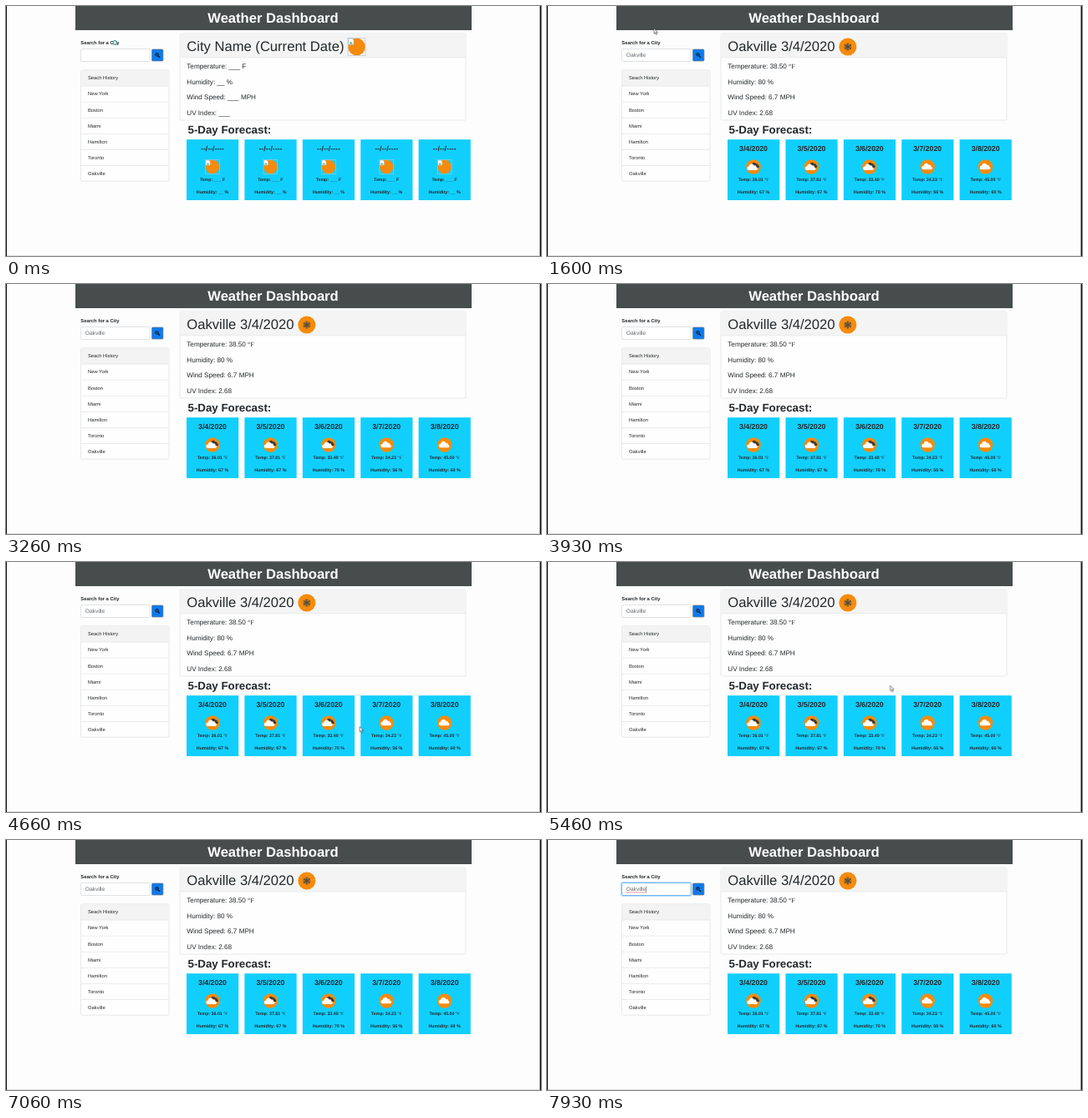
An HTML page that plays this animation: 640 by 300 pixels, repeating every 8000 ms.

```html
<!DOCTYPE html>
<html lang="en">
<head>
<meta charset="utf-8">
<title>Weather Dashboard</title>
<style>
html, body { margin: 0; width: 100%; height: 100%; overflow: hidden; background: #fdfdfd; }
svg { display: block; width: 640px; height: 300px; }
text { font-family: "Liberation Sans", Arial, sans-serif; fill: #24282b; text-rendering: geometricPrecision; white-space: pre; }
.b { font-weight: bold; }
.unit { font-family: "Liberation Serif", serif; font-weight: normal; }
</style>
</head>
<body>
<svg id="stage" viewBox="0 0 640 300" xmlns="http://www.w3.org/2000/svg">
  <defs>
    <g id="broken">
      <circle r="10.4" fill="#f68b0b"/>
      <rect x="-10.5" y="-10.5" width="21" height="21" fill="none" stroke="#c4c4c4" stroke-width=".7"/>
      <path d="M-10-10h4.5l2 2v5.5h-6.500z" fill="#fff" stroke="#9bb0c4" stroke-width=".7"/>
      <path d="M-9-3.500l2-2.500 2.500 2.500z" fill="#58a55c"/>
    </g>
    <g id="snow">
      <circle r="10.5" fill="#f68b0b"/>
      <g id="flake" fill="none" stroke="#4c4a46" stroke-width="1"></g>
    </g>
    <path id="puff" d="M-4.600 3.300a2.300 2.300 0 0 1 0-4.600a3.200 3.200 0 0 1 6.100-1a2.600 2.600 0 0 1 3 2.300a1.700 1.700 0 0 1 0 3.300z"/>
    <g id="cloud">
      <circle r="8.700" fill="#f68b0b"/>
      <use href="#puff" fill="#fff"/>
    </g>
    <g id="clouds">
      <circle r="8.700" fill="#f68b0b"/>
      <use href="#puff" fill="#3d3b39" transform="translate(2 -1.700) scale(.85)"/>
      <use href="#puff" fill="#fff" transform="translate(-.8 .7)"/>
    </g>
  </defs>
  <rect width="640" height="300" fill="#fdfdfd"/>
  <g id="base"></g>
  <g id="blank"></g>
  <g id="data" opacity="0"></g>
  <g id="focus" opacity="0">
    <rect x="88.600" y="50.900" width="84.200" height="16.200" rx="2" fill="none" stroke="#bfe0ff" stroke-width="1.600"/>
    <rect x="89.500" y="51.500" width="82.700" height="15" rx="1.300" fill="#fff" stroke="#62b0f5" stroke-width=".9"/>
  </g>
  <g id="typed" opacity="0"></g>
  <g id="spell" opacity="0">
    <path id="wave" fill="none" stroke="#e2504d" stroke-width=".7"/>
    <path d="M118.700 55.500v7" stroke="#444" stroke-width=".6"/>
  </g>
  <g id="busy">
    <circle cx="130.300" cy="44" r="2.300" fill="#fdfdfd" stroke="#4f9c9c" stroke-width="1.200"/>
  </g>
  <g id="pointer" opacity="0">
    <path d="M0 0v6.300l1.500-1.300 1 2.300 1-.4-1-2.300h2z" fill="#fff" stroke="#333" stroke-width=".6"/>
  </g>
</svg>
<script>
const $ = id => document.getElementById(id);
const LOOP = 8000;

const rect = (x, y, w, h, fill, stroke = "none", r = 0) =>
  `<rect x="${x}" y="${y}" width="${w}" height="${h}" fill="${fill}" stroke="${stroke}" stroke-width=".7" rx="${r}"/>`;
const text = (x, y, size, str, extra = "") =>
  `<text x="${x}" y="${y}" font-size="${size}" ${extra}>${str}</text>`;
const icon = (id, x, y, scale = 1) =>
  `<use href="#${id}" transform="translate(${x} ${y}) scale(${scale})"/>`;
const unit = size => `<tspan class="unit" font-size="${size}">°F</tspan>`;
const bold = 'class="b"';
const mid = 'class="b" text-anchor="middle"';
const cardX = i => 216 + i * 69.4;

function drawBase() {
  const cities = ["Seach History", "New York", "Boston", "Miami", "Hamilton", "Toronto", "Oakville"];
  const line = "#dfe0e1";
  let s = rect(0, 0, 1, 300, "#111") + rect(638.6, 0, 1.4, 300, "#111") + rect(1, 299.3, 637, .7, "#d4d4d4");
  s += rect(83, 0, 474, 29, "#474d4d");
  s += text(319.5, 19.8, 16.6, "Weather Dashboard", mid + ' style="fill:#fff"');
  s += text(89.3, 45.5, 5.8, "Search for a City", bold);
  s += rect(89.5, 51.5, 82.7, 15, "#fff", "#d3d7da", 1.3);
  s += rect(174.5, 52, 13.4, 14, "#0b7bf0", "#6d7880", 1);
  s += `<g fill="none" stroke="#10171d"><circle cx="180.500" cy="58.300" r="1.800" stroke-width="1"/>
    <path d="M181.900 59.700l2 2" stroke-width="1.300"/><path d="M179.600 58.300h1.800m-.9-.9v1.800" stroke-width=".5"/></g>`;
  s += rect(89.5, 76.8, 105.5, 133.4, "#fefefe", line, 1.5) + rect(89.8, 77, 105, 19, "#f3f3f3");
  cities.forEach((city, i) => {
    const y = 77 + i * 19.05;
    if (i) s += rect(89.5, y - .3, 105.5, .6, line);
    s += text(98, y + 11.4, 5.8, city);
  });
  s += rect(208, 33, 342, 104, "#fefefe", line, 1.5) + rect(208.3, 33.3, 341.4, 28.5, "#f4f4f4");
  s += rect(208, 61.6, 342, .6, line);
  s += text(217.5, 153, 13.3, "5-Day Forecast:", bold);
  for (let i = 0; i < 5; i++) s += rect(cardX(i), 160.2, 62.2, 72.8, "#11cffd");
  $("base").innerHTML = s;
}

function drawWeather(id, title, rows, cards) {
  let s = text(216.3, 53.6, 16.6, title);
  rows.forEach((row, i) => s += text(216.3, 74.9 + i * 18.6, 8.15, row));
  cards.forEach(([date, pic, scale, temp, hum], i) => {
    const x = cardX(i) + 31;
    s += text(x, 174, 8.7, date, mid) + icon(pic, x, 193, scale);
    s += text(x, 210.2, 5.25, "Temp: " + temp, mid);
    s += text(x, 224.9, 5.35, `Humidity: ${hum} %`, mid);
  });
  $(id).innerHTML = s;
}

drawBase();

drawWeather("blank", "City Name (Current Date)",
  ["Temperature: ___ F", "Humidity: __ %", "Wind Speed: ___ MPH", "UV Index: ___"],
  Array(5).fill(["--/--/----", "broken", .8, "___ F", "__"]));
$("blank").innerHTML += icon("broken", 419.5, 49);

const days = [["36.01", 67], ["37.81", 67], ["33.40", 70], ["34.23", 56], ["45.00", 60]];
drawWeather("data", "Oakville 3/4/2020",
  ["Temperature: 38.50 " + unit(7.9), "Humidity: 80 %", "Wind Speed: 6.7 MPH", "UV Index: 2.68"],
  days.map(([t, h], i) => [`3/${4 + i}/2020`, i < 3 ? "clouds" : "cloud", 1, `${t} ${unit(5.2)}`, h]));
$("data").innerHTML += icon("snow", 359.8, 49);

$("flake").innerHTML = [0, 60, 120, 180, 240, 300].map(a =>
  `<path d="M0 0v-4.800M-1.500-4.100l1.500 1.300 1.500-1.300M-1.300-2.200l1.300 1 1.300-1" stroke-width=".8" transform="rotate(${a})"/>`).join("");
$("typed").innerHTML = text(94.8, 61.2, 6.6, "Oakville", 'style="fill:#5f666c"');
$("wave").setAttribute("d", "M95 62.900" + "q.5-.9 1 0t1 0".repeat(12));

// Each step: [time in ms, properties]
function play(id, steps, easing) {
  const frames = steps.map(([t, props]) => ({ offset: t / LOOP, easing, ...props }));
  frames.push({ ...frames[frames.length - 1], offset: 1 });
  $(id).animate(frames, { duration: LOOP, iterations: Infinity });
}
const fade = (id, ...steps) =>
  play(id, steps.map(([t, opacity]) => [t, { opacity }]), "steps(1, end)");

fade("blank", [0, 1], [1130, 0]);
fade("busy", [0, 1], [1130, 0]);
fade("data", [0, 0], [1130, 1]);
fade("typed", [0, 0], [1400, 1]);
fade("focus", [0, 0], [7600, 1]);
fade("spell", [0, 0], [7730, 1]);
fade("pointer", [0, 0], [1130, 1], [3200, 0], [4130, 1], [6540, 0]);

const path = [
  [0, 128, 27], [2060, 128, 27], [2600, 128.3, 31.3], [2930, 127, 35],
  [3200, 122, 51], [4000, 124, 60], [4130, 150, 72], [4400, 330, 158],
  [4660, 423, 197.5], [5100, 440, 192], [5530, 405, 140], [6000, 372, 70],
  [6330, 364, 49], [6400, 364, 49], [6600, 127, 59]
];
play("pointer", path.map(([t, x, y]) => [t, { transform: `translate(${x}px, ${y}px)` }]), "linear");
</script>
</body>
</html>
```
